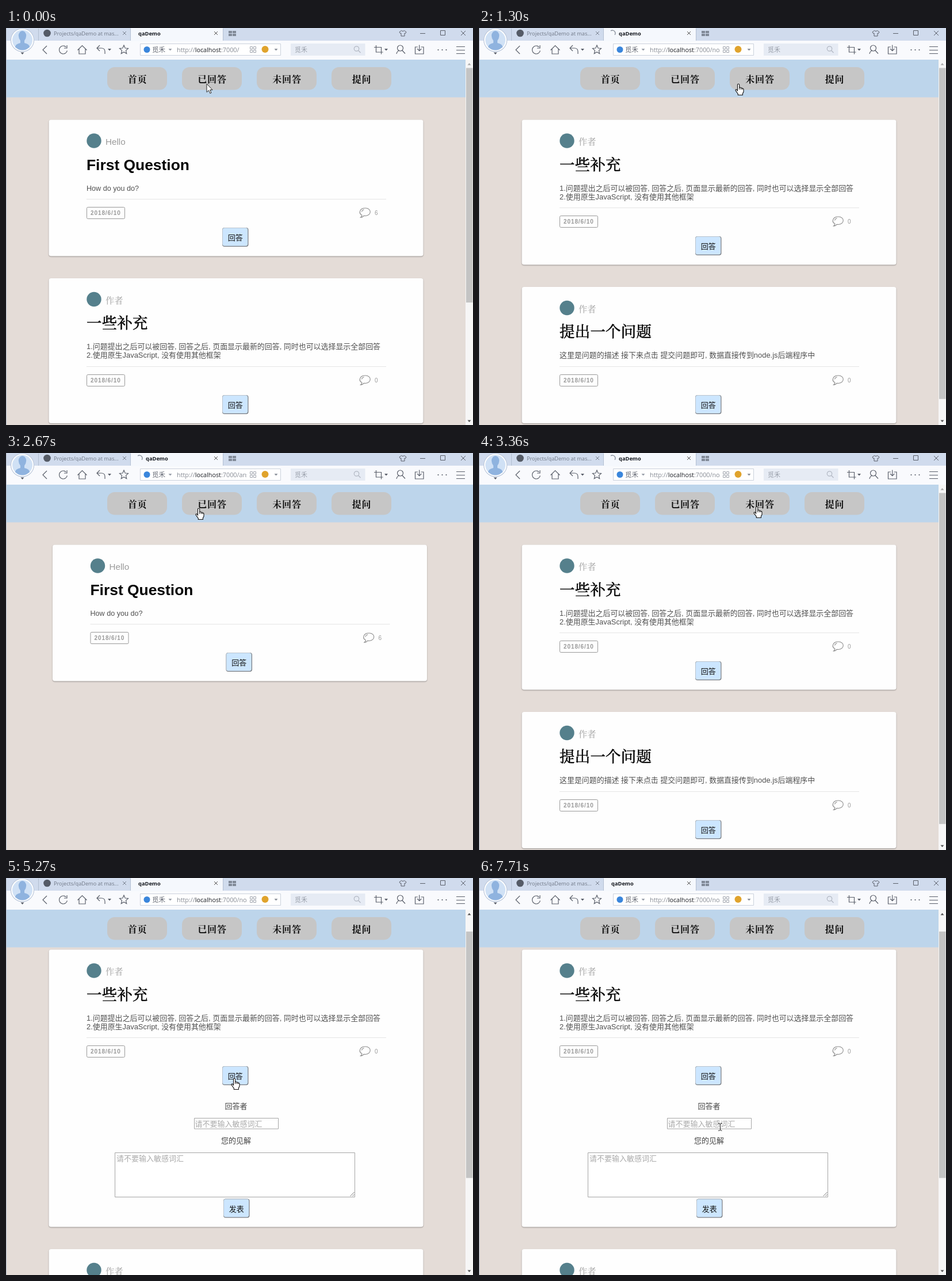
An HTML page with a canvas for the animation above (8000 ms loop, 812 px wide and 690 px high).

```html
<!DOCTYPE html>
<html lang="zh-CN">
<head>
<meta charset="utf-8">
<title>qaDemo</title>
<style>
html, body { margin: 0; width: 100%; height: 100%; overflow: hidden; background: #e4dcd7; }
canvas { display: block; }
</style>
</head>
<body>
<canvas id="stage" width="812" height="690"></canvas>
<script>
const g = document.getElementById('stage').getContext('2d');
const LOOP = 8000, W = 812, H = 690, TOP = 55;
const SANS = '"Liberation Sans", "Noto Sans CJK SC", "Noto Sans CJK", sans-serif';
const SERIF = '"Liberation Sans", "Noto Serif CJK SC", "Noto Sans CJK SC", "Noto Sans CJK", serif';
const UI = '"Open Sans", "Noto Sans CJK SC", "Noto Sans CJK", sans-serif';
const INK = '#5a5f6a';

// Chinese headings are thickened regular glyphs, Latin ones a true bold.
const HEAD = { font: SERIF, fat: 0.6, gap: 0.3 };
const BOLD = { font: SANS, weight: 700 };

const first = { by: 'Hello', title: 'First Question', head: BOLD, size: 12.6, replies: 6, body: ['How do you do?'] };
const extra = { by: '作者', title: '一些补充', head: HEAD, size: 12.95, replies: 0, body: [
  '1.问题提出之后可以被回答, 回答之后, 页面显示最新的回答, 同时也可以选择显示全部回答',
  '2.使用原生JavaScript, 没有使用其他框架'] };
const ask = { by: '作者', title: '提出一个问题', head: HEAD, size: 12.95, replies: 0, body: [
  '这里是问题的描述 接下来点击 提交问题即可, 数据直接传到node.js后端程序中'] };
const pages = { home: [first, extra, ask], answered: [first], pending: [extra, ask] };

// Each row changes only the fields it names; busy holds the time loading began.
const events = [
  [0, { page: 'home', path: '', busy: 0, tip: '', scroll: 0, form: false }],
  [120, { page: 'answered', path: 'answer', busy: 120 }],
  [360, { busy: 0 }],
  [500, { tip: 'noAnswer' }],
  [1060, { tip: '' }],
  [1180, { path: 'noAnswer' }],
  [1300, { page: 'pending', busy: 1300 }],
  [1570, { busy: 0 }],
  [1990, { tip: 'answer' }],
  [2390, { tip: '' }],
  [2510, { path: 'answer' }],
  [2670, { page: 'answered', busy: 2670 }],
  [2940, { busy: 0 }],
  [3060, { tip: 'noAnswer' }],
  [3220, { tip: '' }],
  [3360, { page: 'pending', path: 'noAnswer', busy: 3360 }],
  [3600, { busy: 0 }],
  [3880, { scroll: 31 }],
  [4030, { scroll: 35 }],
  [5270, { form: true }]
];
const moves = [
  [0, arrow, 349, 97], [120, hand, 349, 97], [500, hand, 451, 97],
  [1450, hand, 472, 96], [1570, hand, 498, 96], [1690, hand, 523, 96],
  [1840, hand, 447, 95], [1990, hand, 335, 96], [2940, hand, 410, 95],
  [3060, hand, 483, 94], [3220, hand, 483, 93], [3480, arrow, 470, 150],
  [3600, arrow, 446, 250], [3880, arrow, 425, 310], [4030, arrow, 420, 329],
  [4310, hand, 397, 348], [5520, hand, 397, 336], [5830, arrow, 438, 440],
  [5950, beam, 434, 475], [6110, arrow, 426, 458], [6230, beam, 424, 444],
  [6380, beam, 419, 428], [6780, beam, 419, 425], [7710, beam, 419, 426]
];

function text(s, x, y, size, color, { font = SANS, weight = 400, align = 'left', gap = 0, fat = 0 } = {}) {
  g.font = `${weight} ${size}px ${font}`;
  g.letterSpacing = gap + 'px';
  g.textAlign = align;
  g.fillStyle = color;
  g.fillText(s, x, y);
  if (fat) {
    g.strokeStyle = color;
    g.lineWidth = fat;
    g.strokeText(s, x, y);
  }
  return g.measureText(s).width;
}
function rect(x, y, w, h, color) {
  g.fillStyle = color;
  g.fillRect(x, y, w, h);
}
function box(x, y, w, h, r, fill, edge) {
  g.beginPath();
  g.roundRect(x, y, w, h, r);
  if (fill) { g.fillStyle = fill; g.fill(); }
  if (edge) { g.strokeStyle = edge; g.lineWidth = 1; g.stroke(); }
}
function disc(x, y, r, color) {
  g.beginPath();
  g.arc(x, y, r, 0, 2 * Math.PI);
  g.fillStyle = color;
  g.fill();
}
function ring(x, y, r, color = INK, from = 0, to = 2 * Math.PI, width = 1.2) {
  g.beginPath();
  g.arc(x, y, r, from, to);
  g.strokeStyle = color;
  g.lineWidth = width;
  g.stroke();
}
function line(d, color = INK, width = 1.2, x = 0, y = 0) {
  g.save();
  g.translate(x, y);
  g.strokeStyle = color;
  g.lineWidth = width;
  g.stroke(new Path2D(d));
  g.restore();
}
function shape(d, color, x = 0, y = 0) {
  g.save();
  g.translate(x, y);
  g.fillStyle = color;
  g.fill(new Path2D(d));
  g.restore();
}
function caret(x, y, color = INK, up = 1) {
  shape(`M-3 ${-1.5 * up}h6l-3 ${3.5 * up}z`, color, x, y);
}

function arrow(x, y) {
  const d = 'M0 0V14.5L3.4 11.4L5.8 16.6L8 15.6L5.7 10.6H10z';
  shape(d, '#fff', x, y);
  line(d, '#222', 1, x, y);
}
function hand(x, y) {
  const d = 'M-1.5 12V1.5Q-1.5 .2 0 .2T1.7 1.5V6.5Q3.5 5.5 4.4 7.2Q6 6.5 6.7 8.2Q9 7.8 9 10V14L7.4 17V19.5H-.7V17.5L-5 11.5Q-5 9-2.8 10.3z';
  shape(d, '#fff', x, y);
  line(d, '#111', 1.1, x, y);
  line('M1.7 6.5V10M4.4 7.5V10M6.7 8.5V10', '#111', 1, x, y);
}
function beam(x, y) {
  line('M-3 .5H-1L.5 1.5L2 .5H3.5M.5 1.5V12M-3 13H-1L.5 12L2 13H3.5', '#222', 1, x, y);
}

function tabs(s, t) {
  rect(0, 0, W, 22, '#d0dbed');
  rect(56, 1, 1, 21, '#b3bfd2');
  rect(217, 0, 160, 23, '#f5f8fd');
  rect(216, 1, 1, 21, '#b3bfd2');
  rect(377, 1, 1, 21, '#b3bfd2');
  disc(71.5, 9, 6.3, '#555b66');
  text('Projects/qaDemo at mas...', 83, 13, 9.2, '#707887', { font: UI });
  line('M203 6l6 6m0-6l-6 6', '#777f8d', 1);
  line('M362 6l6 6m0-6l-6 6', '#555', 1);
  if (s.busy) {
    const turn = Math.floor((t - s.busy) / 120) * 0.7;
    ring(232, 9, 5, '#8a919d', turn - 2.2, turn + 0.6, 1.3);
  }
  text('qaDemo', s.busy ? 243 : 230, 13, 9.3, '#15181e', { font: UI, weight: 700 });
  for (const [x, y] of [[387, 5], [394, 5], [387, 10], [394, 10]]) rect(x, y, 6, 4, '#808997');
  line('M687.5 4.5L684 7l1.5 2.5l1.5-.5v5h6v-5l1.5 .5L696 7l-3.5-2.5Q690 7 687.5 4.5z', INK, 1);
  rect(720, 9, 9, 1, INK);
  line('M755.5 4.5h8v8h-8zM791 5l8 8m0-8l-8 8', INK, 1);
}

function toolbar(s) {
  rect(0, 22, W, 33, '#f9fafd');
  rect(217, 22, 160, 1, '#f5f8fd');
  // profile badge
  disc(28.5, 21, 20.5, '#b9c6da');
  disc(28.5, 21, 19.5, '#fff');
  disc(28.5, 21, 17.5, '#d0e1f5');
  g.save();
  g.beginPath();
  g.arc(28.5, 21, 17.5, 0, 7);
  g.clip();
  shape('M16 40V33Q16 28 25 26V22Q21 17 22 11Q24 5 28.5 5T35 11Q36 17 32 22V26Q41 28 41 33V40z', '#8fb3df');
  g.restore();
  caret(28.5, 44);
  line('M71 31l-7 7l7 7');
  ring(99.5, 38, 7, INK, 0.2, 5.5);
  line('M106 30v5h-5');
  line('M124.5 38.5L132.5 30.5L140.5 38.5M127 36.5v8.5h11v-8.5');
  line('M163 30l-5 5l5 5M158.5 35h7.5q6 0 6 6v4');
  caret(180, 37.5);
  line('M205 30l2.2 5l5.3 .5l-4 3.6l1.2 5.4l-4.7-2.8l-4.7 2.8l1.2-5.4l-4-3.6l5.3-.5z');

  box(233.5, 27.5, 244, 20, 0, '#fff', '#cbd1dc');
  disc(245, 37.5, 5.5, '#3a86dc');
  text('觅禾', 254, 41.5, 11.5, '#606570', { font: UI });
  caret(285.5, 37.5, '#9aa0aa');
  g.save();
  g.beginPath();
  g.rect(290, 28, 129, 19);
  g.clip();
  let x = 297;
  for (const [part, color] of [['http://', '#858a93'], ['localhost', '#1c1f25'], [':7000/' + s.path, '#858a93']])
    x += text(part, x, 41.5, 10.8, color, { font: UI });
  g.restore();
  line('M424.5 32.5h4v4h-4zM430.5 32.5h4v4h-4zM424.5 38.5h4v4h-4zM430.5 38.5h4v4h-4z', '#a0a5ae', 1);
  disc(450.5, 37, 6, '#e0a32c');
  caret(469.5, 37.5, '#8b919b');

  rect(495, 27, 129.5, 21, '#e6ebf4');
  text('觅禾', 502, 41.5, 11, '#979da8', { font: UI });
  ring(609.5, 36, 4.2, '#b2b8c3');
  line('M612.5 39l4 4', '#b2b8c3');
  line('M643.5 30v12h12M640 33.5h12.5v12');
  caret(661, 37.5);
  ring(685.5, 35, 5);
  line('M689 39l5 5.5M679 45q1-5 5-6');
  line('M716 33h-4.5v12h14.5V33h-4.5M718.7 29.5v10M715 36l3.7 3.7l3.7-3.7');
  for (const dx of [0, 7, 14]) disc(751.5 + dx, 38, 1.1, INK);
  for (const y of [32, 38, 44]) rect(783, y, 15, 1, INK);
}

function button(x, y, label) {
  box(x, y, 45.5, 33, 4, '#70757c');
  box(x, y, 44.5, 32, 4, '#b9c4ce');
  box(x + 1, y + 1, 43, 30.5, 3, '#cce6ff');
  text(label, x + 22.7, y + 22, 13, '#111', { align: 'center' });
}

function replyForm(left, y) {
  const mid = { align: 'center' }, hint = '请不要输入敏感词汇';
  text('回答者', left + 260, y + 24.5, 13, '#444', mid);
  box(left + 187.5, y + 41, 146, 18.5, 0, '#fff', '#a5a5a5');
  text(hint, left + 188.5, y + 55, 13, '#a9a9a9');
  text('您的见解', left + 260, y + 84.5, 13, '#444', mid);
  box(left + 49.5, y + 101, 417, 77, 0, '#fff', '#a5a5a5');
  text(hint, left + 52, y + 115, 13, '#a9a9a9');
  line('M0 7l7-7M4 7l3-3', '#777', 1, left + 458.5, y + 169.5);
  button(left + 238, y + 181, '发表');
}

function cardHeight(c, open) {
  return 222 + 15 * c.body.length + (open ? 230 : 0);
}

function card(c, x, y, open) {
  g.save();
  g.shadowColor = 'rgba(0,0,0,.35)';
  g.shadowBlur = 2;
  g.shadowOffsetY = 1;
  box(x, y, 651, cardHeight(c, open), 4, '#fefefe');
  g.restore();
  const left = x + 65.5;
  disc(left + 13, y + 36.5, 12.7, '#55808c');
  text(c.by, left + 33, y + 43.5, 15.2, '#9a9a9a', { font: SERIF });
  text(c.title, left, y + 87, 26.4, '#050505', c.head);
  c.body.forEach((s, i) => text(s, left, y + 123 + 15 * i, c.size, '#505050'));

  const rule = Math.round(y + 123.5 + 15 * c.body.length);
  rect(left, rule - 1, 521, 1, '#e5e5e5');
  box(left + 0.5, rule + 13.5, 66, 20, 2, null, '#999');
  text('2018/6/10', left + 7, rule + 27, 10, '#999', { weight: 700, gap: 0.9 });
  line('M-6 4.8C-12 2-11-7.5 0-7.5S11 5.5 0 6L-3 5.8Q-5 9-8.5 8.8Q-6 7-6 4.8zM-6.5-1Q-6-4-2.5-5', '#8c8c8c', 1.1, left + 485, rule + 22.5);
  text(c.replies, left + 501, rule + 27, 10, '#999');
  button(left + 236, rule + 49, '回答');
  if (open) replyForm(left, y + cardHeight(c));
}

function page(s) {
  rect(0, TOP, W, H - TOP, '#e4dcd7');
  const list = pages[s.page];
  const isOpen = i => s.form && i === 0;
  const full = list.reduce((sum, c, i) => sum + cardHeight(c, isOpen(i)) + 38.5, 104);
  const view = H - TOP, scrolls = full > view;
  const x = scrolls ? 74.5 : 81;
  let y = 159.5 - s.scroll;
  list.forEach((c, i) => {
    if (y < H) card(c, x, y, isOpen(i));
    y += cardHeight(c, isOpen(i)) + 38.5;
  });

  rect(0, TOP, W, 65.5, '#bdd5eb');
  ['首页', '已回答', '未回答', '提问'].forEach((label, i) => {
    const bx = 176 + 130 * i;
    box(bx, 68, 104, 39.5, 13, '#c6c6c6');
    text(label, bx + 52.5, 94.5, 16, '#0b0b0b', { font: SERIF, weight: 700, align: 'center', gap: 0.8 });
  });

  if (scrolls) {
    const track = 607;
    rect(799, TOP, 13, view, '#f6f6f6');
    rect(800, 69.5 + track * s.scroll / full, 11.5, track * view / full, '#c4c4c4');
    caret(805.5, 63, s.scroll ? '#505050' : '#a8a8a8', -1);
    caret(805.5, 683, s.scroll === 35 && !s.form ? '#a8a8a8' : '#505050');
  }
}

function linkTip(path) {
  const s = 'localhost:7000/' + path;
  box(5.5, 666.5, s.length * 6 + 16, 19, 2, '#f7f8fa', '#c3c8d0');
  text(s, 12, 680, 11, '#666', { font: UI });
}

function draw(now) {
  const t = now % LOOP;
  const s = Object.assign({}, ...events.filter(e => e[0] <= t).map(e => e[1]));
  page(s);
  toolbar(s);
  tabs(s, t);
  rect(0, 0, 1, H, '#b4bccb');
  badge();
  if (s.tip) linkTip(s.tip);
  const [, cursor, x, y] = moves.filter(m => m[0] <= t).pop();
  cursor(x, y);
}

function badge() {
  disc(28.5, 21, 20.5, '#b9c6da');
  disc(28.5, 21, 19.5, '#fff');
  disc(28.5, 21, 17.5, '#d0e1f5');
  g.save();
  g.beginPath();
  g.arc(28.5, 21, 17.5, 0, 7);
  g.clip();
  shape('M16 40V33Q16 28 25 26V22Q21 17 22 11Q24 5 28.5 5T35 11Q36 17 32 22V26Q41 28 41 33V40z', '#8fb3df');
  g.restore();
}

const start = performance.now();
function tick() {
  draw(performance.now() - start);
  requestAnimationFrame(tick);
}
tick();
</script>
</body>
</html>
```
